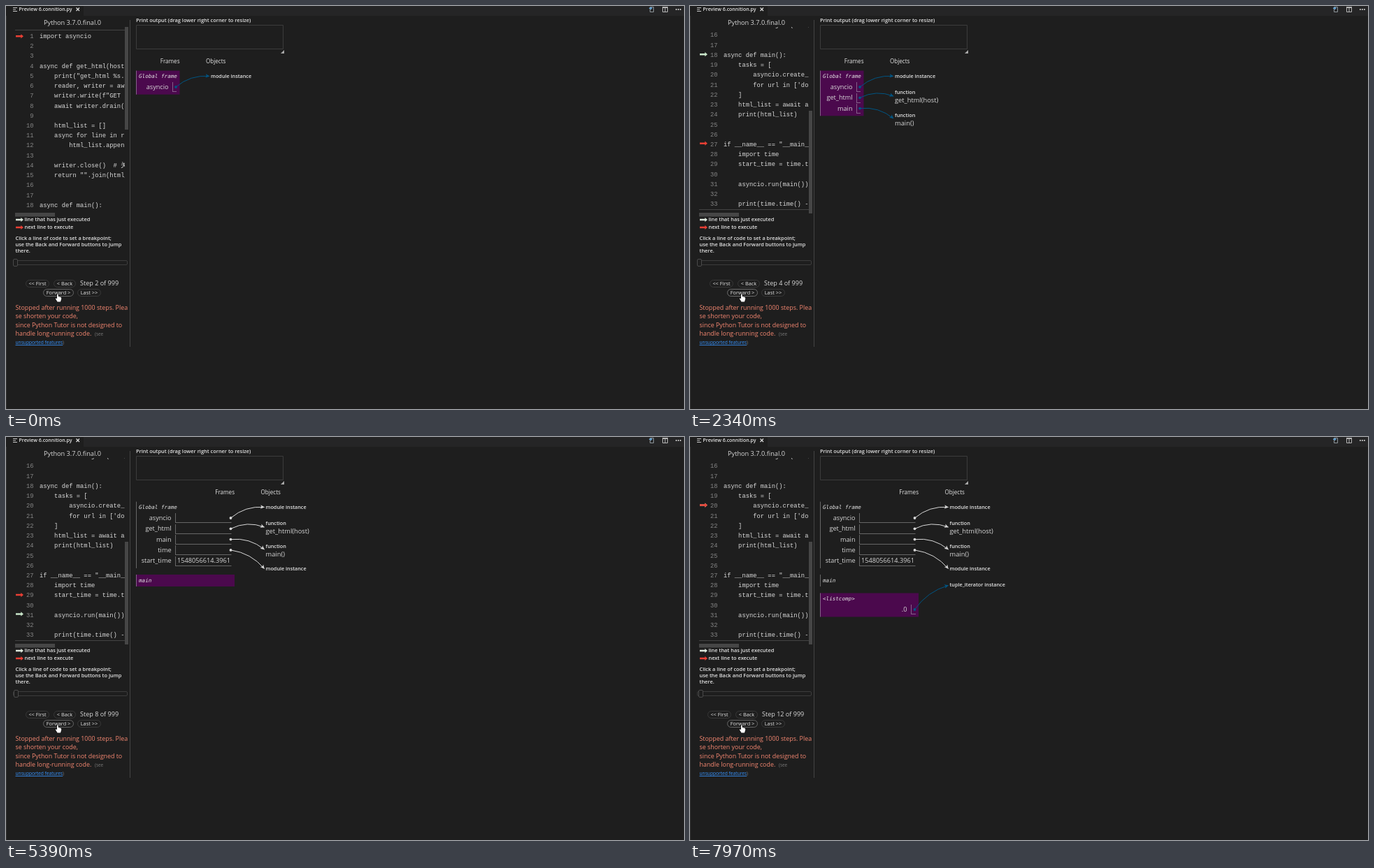
Recreate the animation shown at these times as an HTML page with a canvas. Size 970 px wide and 577 px high, loop 8000 ms.

```html
<!DOCTYPE html>
<html lang="en">
<head>
<meta charset="utf-8">
<title>Code stepper</title>
<style>
html, body { margin: 0; width: 970px; height: 577px; overflow: hidden; background: #1e1e1e; }
canvas { display: block; }
</style>
</head>
<body>
<canvas id="stage" width="970" height="577"></canvas>
<script>
const ctx = document.getElementById('stage').getContext('2d');
const LOOP = 8000, TICK = 75, SCROLL = 215;
const SANS = '"Open Sans", "Noto Sans", sans-serif';
const MONO = '"Liberation Mono", "Noto Sans CJK SC", monospace';
const LABEL = '"DejaVu Sans Mono", monospace';
const TEXT = '#d8d8d8', BRIGHT = '#e4e4e4', LINE = '#444', RED = '#e93f34', GREEN = '#c9e6ca';
const PURPLE = '#4b094d', EDGE = '#85608a', DIM_EDGE = '#666', LINK = '#005583';

// Start time of each step, beginning with step 2, and the line each step (from 1) points at.
const starts = [-110, 570, 1330, 2490, 3360, 4150, 5160, 5860, 6650, 7270, 7820];
const lines = [1, 4, 18, 27, 28, 29, 31, 18, 20, 21, 20, 20];
const presses = [420, 1100, 2340, 3190, 3980, 4920, 5610, 6480, 7040, 7650];

const code = `import asyncio


async def get_html(host):
    print("get_html %s..."
    reader, writer = await
    writer.write(f"GET / H
    await writer.drain()

    html_list = []
    async for line in read
        html_list.append(l

    writer.close()  # 关
    return "".join(html_li


async def main():
    tasks = [
        asyncio.create_tas
        for url in ['docs'
    ]
    html_list = await asyn
    print(html_list)


if __name__ == "__main__":
    import time
    start_time = time.time

    asyncio.run(main())

    print(time.time() - st`.split('\n');

const globals = [
  { name: 'asyncio', since: 2, endY: 100.5 },
  { name: 'get_html', since: 3, endY: 129, call: 'get_html(host)' },
  { name: 'main', since: 4, endY: 161, call: 'main()' },
  { name: 'time', since: 6, endY: 188.5 },
  { name: 'start_time', since: 7, value: '1548056614.3961' }
];

function text(str, x, y, size, { color = TEXT, font = SANS, style = '', align = 'left' } = {}) {
  ctx.font = `${style} ${size}px ${font}`;
  ctx.fillStyle = color;
  ctx.textAlign = align;
  ctx.fillText(str, x, y + size * 0.33);
}

const strong = (str, x, y, size = 7.4, align = 'left') =>
  text(str, x, y, size, { color: BRIGHT, style: '600', align });

function rect(x, y, w, h, color) {
  ctx.fillStyle = color;
  ctx.fillRect(x, y, w, h);
}

function box(x, y, w, h, color, radius = 0, fill) {
  ctx.beginPath();
  ctx.roundRect(x + 0.5, y + 0.5, w - 1, h - 1, radius);
  if (fill) { ctx.fillStyle = fill; ctx.fill(); }
  ctx.strokeStyle = color;
  ctx.lineWidth = 1;
  ctx.stroke();
}

function polygon(points, color) {
  ctx.beginPath();
  points.forEach(([x, y]) => ctx.lineTo(x, y));
  ctx.closePath();
  ctx.fillStyle = color;
  ctx.fill();
}

function lineArrow(y, color) {
  const shape = [[0, 3], [12, 3], [12, 0], [18, 5], [12, 10], [12, 7], [0, 7]];
  polygon(shape.map(([px, py]) => [14 + px * 0.61, y + (py - 5) * 0.62]), color);
}

function button(label, x, y, w, border = '#383838') {
  box(x, y, w, 11, border, 5);
  text(label, x + w / 2, y + 5.5, 7.4, { color: BRIGHT, style: '500', align: 'center' });
}

// Bowed connector from a value slot to an object.
function connector(x1, y1, x2, y2, color) {
  const dx = x2 - x1, dy = y2 - y1, len = Math.hypot(dx, dy);
  const cx = (x1 + x2) / 2 + dy / len * 10.5, cy = (y1 + y2) / 2 - dx / len * 10.5;
  ctx.beginPath();
  ctx.moveTo(x1, y1);
  ctx.quadraticCurveTo(cx, cy, x2, y2);
  ctx.strokeStyle = color;
  ctx.lineWidth = 1;
  ctx.stroke();
  ctx.beginPath();
  ctx.arc(x1, y1, 1.9, 0, 7);
  ctx.fillStyle = color;
  ctx.fill();
  ctx.save();
  ctx.translate(x2, y2);
  ctx.rotate(Math.atan2(y2 - cy, x2 - cx));
  polygon([[0.5, 0], [-5.5, -2.8], [-4, 0], [-5.5, 2.8]], color);
  ctx.restore();
}

function drawTopBar() {
  rect(0, 0, 970, 14, '#252526');
  rect(0, 0, 111, 14, '#1e1e1e');
  rect(0, 14, 1, 563, '#303030');
  [2, 4.5, 7].forEach((y, i) => rect(10, y, i === 1 ? 4 : 6, 1, '#c5c5c5'));
  strong('Preview 6.connition.py', 18.5, 5, 7);
  ctx.strokeStyle = '#ddd';
  ctx.lineWidth = 1.2;
  ctx.beginPath();
  ctx.moveTo(100.5, 2.5); ctx.lineTo(105, 7);
  ctx.moveTo(105, 2.5); ctx.lineTo(100.5, 7);
  ctx.stroke();
  box(921, 1, 6, 8, '#8d9499');
  polygon([[920, 2.5], [922, 2.5], [922, 1], [925, 3.2], [922, 5.4], [922, 4], [920, 4]], '#5f9fd0');
  box(939, 1, 8, 8, '#b5b5b5');
  rect(939, 1, 8, 2, '#b5b5b5');
  rect(942.5, 2, 1, 7, '#b5b5b5');
  [958, 961, 964].forEach(x => rect(x, 4, 1.8, 1.8, '#c8c8c8'));
}

const easeCubic = p => p < 0.5 ? 4 * p ** 3 : 1 - 4 * (1 - p) ** 3;
const easeSwing = p => 0.5 - Math.cos(Math.PI * p) / 2;
const clamp = p => Math.max(0, Math.min(1, p));
const arrowY = n => 43.3 + (n - 1) * 14.17;

function drawCode(step, elapsed) {
  const progress = step < 4 ? 0 : step > 4 ? 1 : easeSwing(clamp(elapsed / 300));
  const scroll = SCROLL * progress;
  ctx.save();
  ctx.beginPath();
  ctx.rect(11, 30, 159, 265);
  ctx.clip();
  ctx.translate(0, -scroll);
  rect(13, 34, 157, 1, LINE);
  rect(13, 506, 157, 1, LINE);
  code.forEach((line, i) => {
    const y = 43 + i * 14.235;
    text(i + 1, 39.5, y, 8.8, { font: MONO, color: '#858585', align: 'right' });
    text(line, 48, y, 8.8, { font: MONO });
  });
  // The trail arrow lingers, jumps under the pointer, then the pointer slides on.
  const jumped = elapsed >= 2 * TICK;
  const trail = lines[step - (jumped ? 2 : 3)];
  if (trail) lineArrow(arrowY(trail), jumped || elapsed < TICK ? GREEN : '#e8f4e8');
  const from = arrowY(lines[step - 2]), to = arrowY(lines[step - 1]);
  lineArrow(from + (to - from) * easeCubic(clamp((elapsed - 150) / 225)), RED);
  ctx.restore();
  rect(170, 30 + 120 * progress, 5, 147, '#464646');
  rect(13, 296, 57, 5.5, '#464646');
}

function drawHand() {
  ctx.beginPath();
  ctx.moveTo(73, 412.5);
  ctx.lineTo(74.5, 412.5);
  ctx.lineTo(74.8, 416);
  ctx.lineTo(78.8, 417);
  ctx.lineTo(79.3, 419);
  ctx.lineTo(78, 423.5);
  ctx.lineTo(73.5, 423.5);
  ctx.lineTo(70.8, 419);
  ctx.lineTo(71.5, 418.2);
  ctx.lineTo(73, 419.3);
  ctx.closePath();
  ctx.fillStyle = '#fff';
  ctx.strokeStyle = '#111';
  ctx.lineWidth = 1.2;
  ctx.lineJoin = 'round';
  ctx.stroke();
  ctx.fill();
}

function drawControls(step, pressed) {
  text('Python 3.7.0.final.0', 54, 23.5, 9.2);
  lineArrow(306, '#dde8dd');
  strong('line that has just executed', 26.5, 306);
  lineArrow(317, RED);
  strong('next line to execute', 26.5, 317);
  strong('Click a line of code to set a breakpoint;', 13.5, 333);
  strong('use the Back and Forward buttons to jump', 13.5, 342);
  strong('there.', 13.5, 351);

  box(10, 364, 164, 7, '#3c3c3c', 1.5);
  box(10 + Math.round((step - 2) * 0.18), 362, 7, 11, '#4a4a4a', 1.5, '#1e1e1e');

  const shift = step > 9 ? -3 : 0;
  button('<< First', 28 + shift, 392, 34);
  button('< Back', 68 + shift, 392, 32);
  text(`Step ${step} of 999`, 106 + shift, 397.5, 9.05);
  button('Forward >', 53, 405, 44, pressed ? '#6c6c6c' : '#646464');
  button('Last >>', 102, 405, 34);
  drawHand();

  const error = { color: '#f48771' };
  ['Stopped after running 1000 steps. Plea', 'se shorten your code,',
    'since Python Tutor is not designed to', 'handle long-running code.']
    .forEach((str, i) => text(str, 13.5, 432 + i * 12.3, 8.9, error));
  text('(see', 127, 470, 6.4, { color: '#777' });
  text('unsupported features', 13.5, 482, 6.65, { color: '#3794ff' });
  rect(13.5, 485, 67.5, 0.8, '#3794ff');
  text(')', 81, 482, 6.65, { color: '#777' });
  rect(177, 20, 1, 468, LINE);
}

function drawFrame(title, y, w, h, active) {
  if (active) rect(186, y, w, h, PURPLE);
  rect(186, y, 1, h, active ? EDGE : DIM_EDGE);
  text(title, 190, y + 8, 7.6, { font: LABEL, style: 'italic', color: BRIGHT });
}

function drawSlot(name, x, right, y, color) {
  const bottom = Math.round(y + 6.4);
  text(name, x - 5.5, y, 9.15, { align: 'right' });
  rect(x, bottom - 13, 1, 13, color);
  rect(x, bottom, right - x, 1, color);
}

function drawHeap(step) {
  const wide = step >= 7, shift = wide ? 78.5 : 0;
  const objects = 293 + shift, tip = 291 + shift, dot = 243 + shift;
  strong('Print output (drag lower right corner to resize)', 186, 21);
  box(186, 27, 211, 35, '#3c3c3c');
  polygon([[398, 63], [398, 68], [393, 68]], '#aaa');
  text('Frames', 248.5 + shift, 79, 8.1, { align: 'right', color: BRIGHT });
  text('Objects', 286 + shift, 79, 8.1, { color: BRIGHT });

  const shown = globals.filter(v => v.since <= step);
  const width = wide ? 141 : 62.5;
  const inMain = step >= 8, inList = step >= 11;
  const wire = inMain ? '#d8d8d8' : LINK;
  drawFrame('Global frame', 92.6, width, 18.8 + shown.length * 15.3, !inMain);
  if (inMain) drawFrame('main', 197, width, 17, !inList);
  if (inList) drawFrame('<listcomp>', 223.5, width, 34, true);

  shown.forEach((v, i) => {
    const y = 116 + i * 15.3;
    drawSlot(v.name, wide ? 242 : 238, 244 + shift, y, inMain ? DIM_EDGE : EDGE);
    if (v.value) {
      text(v.value, 245, y, 9.2);
      return;
    }
    connector(dot, y, tip, v.endY, wire);
    if (v.call) {
      const top = v.name === 'main' ? 156.5 : 123.5;
      strong('function', objects, top, 7.25);
      text(v.call, objects, top + 11, 9.3);
    } else {
      strong('module instance', objects, v.endY, 7.25);
    }
  });
  if (inList) {
    drawSlot('.0', 316, 323, 247, EDGE);
    connector(dot, 247, tip, 212.5, LINK);
    strong('tuple_iterator instance', objects, 212, 7.25);
  }
}

function draw(t) {
  const index = starts.findLastIndex(start => start <= t);
  const elapsed = Math.floor((t - starts[index]) / TICK) * TICK;
  const step = index + 2;
  const pressed = presses.some(p => p <= t && p > starts[index]);
  rect(0, 0, 970, 577, '#1e1e1e');
  drawTopBar();
  drawCode(step, elapsed);
  drawControls(step, pressed);
  drawHeap(step);
}

function tick() {
  draw(performance.now() % LOOP);
  requestAnimationFrame(tick);
}
tick();
</script>
</body>
</html>
```
